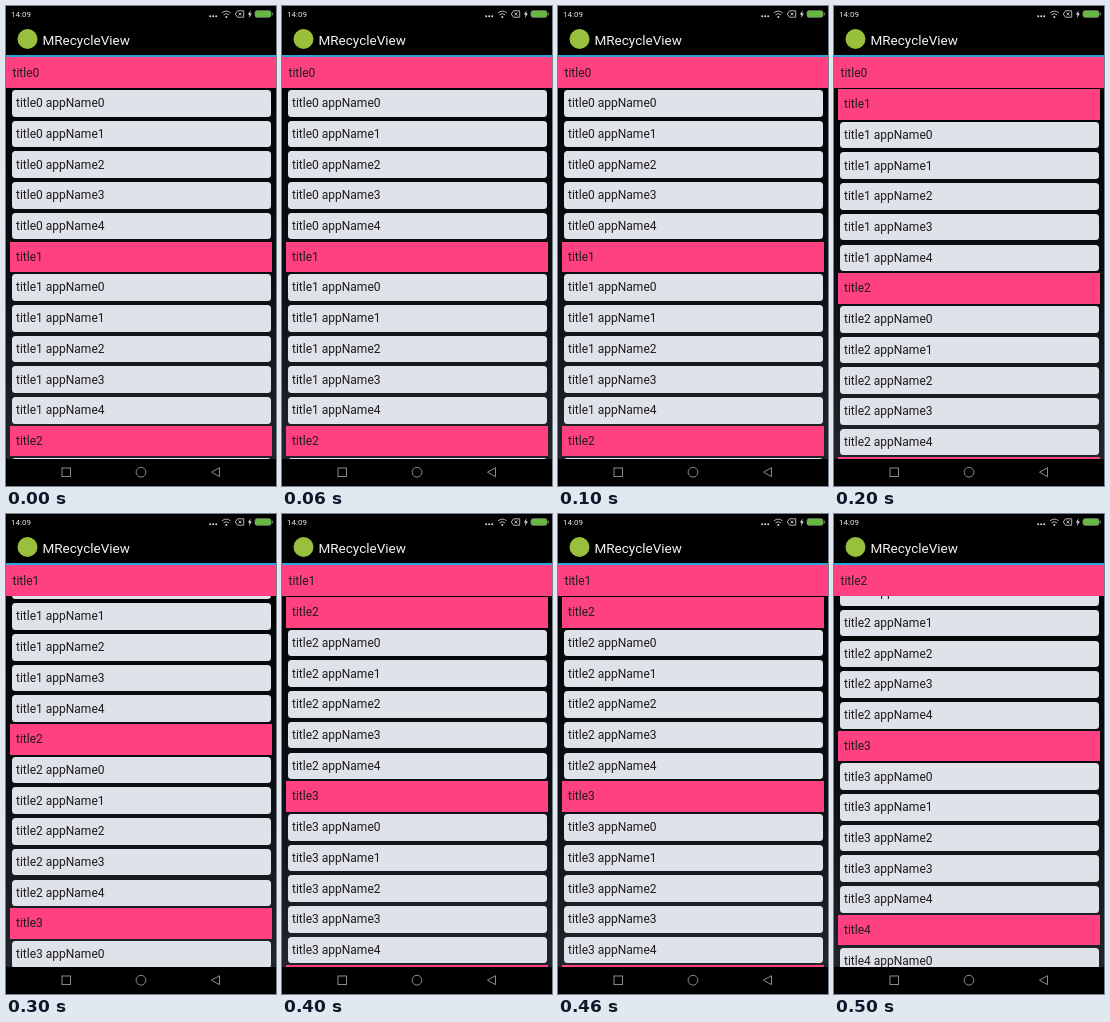
Animation, 270 px wide and 480 px high, one loop 0.6 s. Source, as an HTML page:

```html
<!DOCTYPE html>
<html lang="en">
<head>
<meta charset="utf-8">
<title>MRecycleView</title>
<style>
  html, body { margin: 0; width: 100%; height: 100%; overflow: hidden; background: #000; }
  #stage { position: relative; width: 270px; height: 480px; overflow: hidden; background: #000;
    font: 12px/14px Roboto, "Noto Sans", sans-serif; color: #1d1b1e; }
  #stage > * { position: absolute; }
  #list { left: 0; top: 51px; width: 270px; height: 402px; overflow: hidden;
    background: linear-gradient(#020304, #0b0f13 55%, #20262b); }
  .row { position: absolute; box-sizing: border-box; white-space: pre; }
  .item { left: 5.5px; width: 259.5px; height: 26.7px; padding: 6.3px 0 0 4.5px;
    border-radius: 3.5px; background: #dfe2e8; }
  .title { left: 4px; width: 262px; height: 30.7px; padding: 8.3px 0 0 6px; background: #ff4081; }
  #sticky { left: 0; top: 51px; width: 270px; height: 31px; box-sizing: border-box;
    padding: 9px 0 0 6.5px; background: #ff4081; }
  #line { left: 0; top: 49px; width: 270px; height: 2px; background: #2ba6d6; }
  #name { left: 36.5px; top: 26px; font-size: 13.5px; line-height: 16px; color: #f3f3f3; }
  #clock { left: 5px; top: 3px; font-size: 8px; line-height: 11px; color: #e8e8e8; }
  svg { left: 0; top: 0; }
</style>
</head>
<body>
<div id="stage">
  <div id="list"></div>
  <div id="sticky">title0</div>
  <div id="line"></div>
  <div id="clock">14:09</div>
  <div id="name">MRecycleView</div>
  <svg width="270" height="480" viewBox="0 0 270 480" fill="none">
    <circle cx="21.5" cy="33" r="10" fill="#98c03c"/>
    <g fill="#dcdcdc">
      <circle cx="204.2" cy="10.3" r="1"/>
      <circle cx="207.2" cy="10.3" r="1"/>
      <circle cx="210.2" cy="10.3" r="1"/>
      <circle cx="220.3" cy="11" r="1"/>
      <path d="M244.7 4.2L241.9 8.6h1.7l-.7 3.4 3-4.5h-1.8z"/>
    </g>
    <g stroke="#c8c8c8" stroke-width=".9">
      <path d="M215.9 6.9q4.4-3.6 8.8 0M217.5 8.8q2.8-2.2 5.6 0"/>
      <path d="M229.3 8l2.2-3.2h6.2v6.4h-6.2zM232.6 6.6l2.8 2.8M235.4 6.6l-2.8 2.8"/>
    </g>
    <rect x="249" y="4.7" width="16" height="6.6" rx="2" fill="#65b840" stroke="#8b9a84" stroke-width=".7"/>
    <path d="M266.3 6.7v2.6" stroke="#8b9a84"/>
    <g stroke="#8c8c8c">
      <rect x="56" y="462" width="8.5" height="8.5"/>
      <circle cx="135" cy="466.2" r="4.9"/>
      <path d="M213.5 461.7v9l-8-4.5z" stroke-linejoin="round"/>
    </g>
  </svg>
</div>
<script>
  const ROW = 30.7, GROUP = ROW * 6, STEP = 100;
  const scrolls = [0, 0, 152.5, 209.7, 336.7, 387.3];
  const list = document.getElementById('list');
  const sticky = document.getElementById('sticky');
  const rows = [];

  function addRow(kind, text, y) {
    const el = document.createElement('div');
    el.className = 'row ' + kind;
    el.textContent = text;
    list.append(el);
    rows.push({ el, y });
  }

  for (let g = 0; g < 5; g++) {
    const y = 0.3 + g * GROUP;
    addRow('title', `title${g}`, y);
    for (let i = 0; i < 5; i++) {
      addRow('item', `title${g} appName${i}`, y + (i + 1) * ROW + 2);
    }
  }

  let shown = -1;
  function draw(now) {
    const step = Math.floor(now / STEP) % scrolls.length;
    if (step !== shown) {
      shown = step;
      const scroll = scrolls[step];
      for (const { el, y } of rows) el.style.top = (y - scroll) + 'px';
      sticky.textContent = 'title' + Math.floor(scroll / GROUP);
    }
  }

  const start = performance.now();
  function tick() {
    draw(performance.now() - start);
    requestAnimationFrame(tick);
  }
  tick();
</script>
</body>
</html>
```
